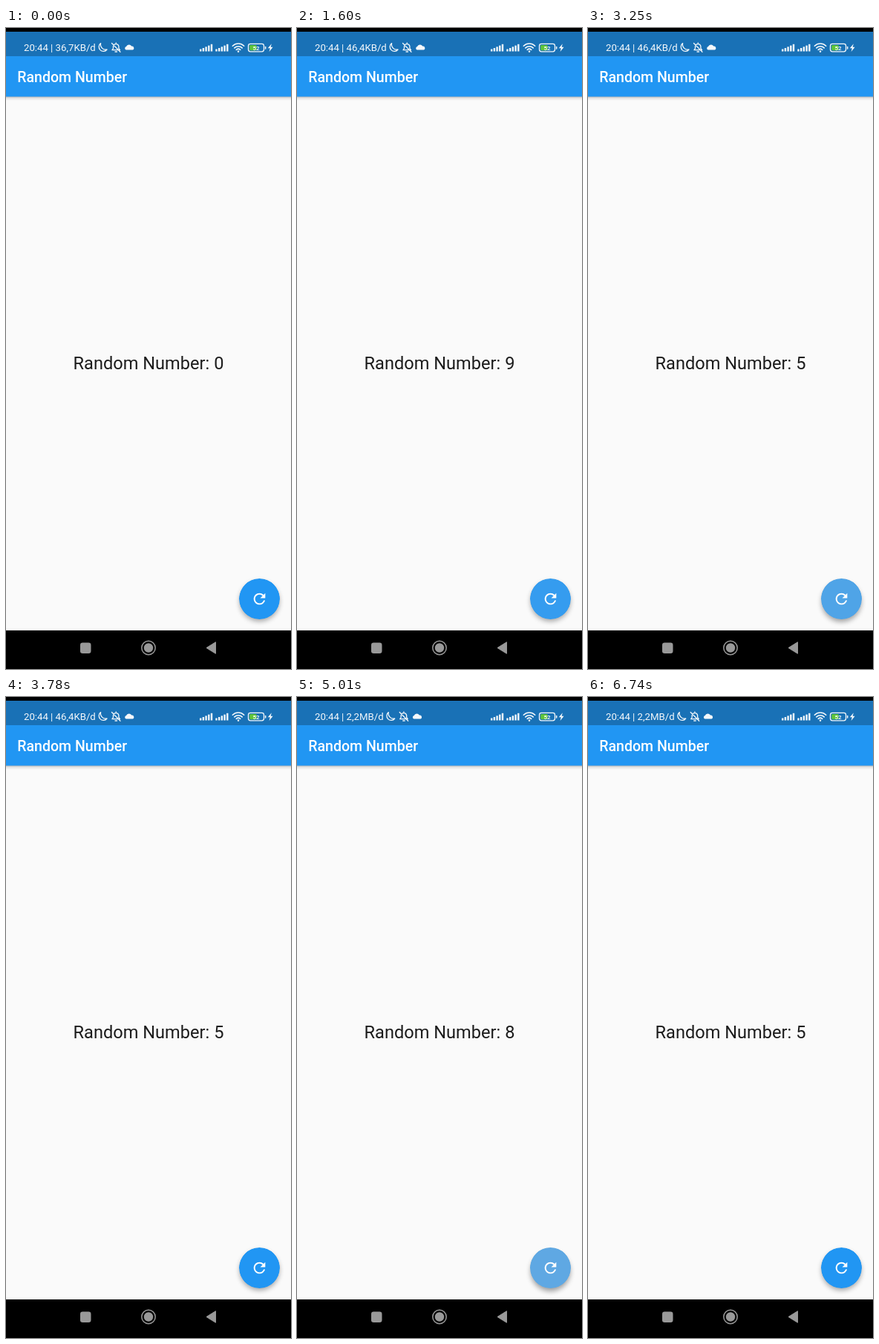
An HTML page for the animation above (6.78 s loop, 384x864 px).

```html
<!DOCTYPE html>
<html lang="en">
<head>
<meta charset="utf-8">
<title>Random Number</title>
<style>
  html, body { margin: 0; width: 100%; height: 100%; overflow: hidden; background: #000; }
  svg { display: block; width: 100%; height: 100%; }
  text { font-family: Roboto, sans-serif; }
  .line { fill: none; stroke: #f4f8fb; stroke-width: 1.3; stroke-linecap: round; stroke-linejoin: round; }
</style>
</head>
<body>
<svg viewBox="0 0 384 864">
  <defs>
    <clipPath id="disc"><circle cx="341.5" cy="769.5" r="27.5"/></clipPath>
    <filter id="blur" x="-50%" y="-50%" width="200%" height="200%"><feGaussianBlur stdDeviation="3.5"/></filter>
    <linearGradient id="edge" x2="0" y2="1">
      <stop stop-opacity=".3"/>
      <stop offset=".4" stop-opacity=".1"/>
      <stop offset="1" stop-opacity="0"/>
    </linearGradient>
    <g id="signal" fill="#f4f8fb">
      <rect y="28.5" width="2.4" height="3"/>
      <rect x="3.7" y="27" width="2.4" height="4.5"/>
      <rect x="7.4" y="25.3" width="2.4" height="6.2"/>
      <rect x="11.1" y="23.6" width="2.4" height="7.9"/>
      <rect x="14.8" y="21.8" width="2.4" height="9.7"/>
    </g>
  </defs>

  <rect width="384" height="864"/>
  <rect y="92" width="384" height="720" fill="#fafafa"/>
  <rect y="92" width="384" height="6" fill="url(#edge)"/>
  <rect y="5" width="384" height="33" fill="#1971b6"/>
  <rect y="38" width="384" height="54.5" fill="#2196f3"/>

  <!-- status bar -->
  <text id="speed" x="24" y="31" font-size="13.2" fill="#f4f8fb"></text>
  <g id="icons">
    <path class="line" d="M127.6 20.6A6 6 0 1 0 136 29A7 7 0 0 1 127.6 20.6Z"/>
    <path class="line" d="M143 29.7h10.5l-1.6-2.2v-3a3.8 3.8 0 0 0-7.4 0v3zM147 32h2.5M148.2 20v.7M142.5 20.5L154 32.2"/>
    <path fill="#f4f8fb" d="M161.8 29.5a2.4 2.4 0 0 1 .2-4.6a4 4 0 0 1 7.2-.3a2.5 2.5 0 0 1 1.2 4.9z"/>
  </g>
  <use href="#signal" x="261"/>
  <use href="#signal" x="282.3"/>
  <g class="line" style="stroke-width:1.6">
    <path d="M305.3 24.2a11 11 0 0 1 15.4 0M307.8 26.9a7.4 7.4 0 0 1 10.4 0M310.3 29.4a4 4 0 0 1 5.4 0"/>
    <circle cx="313" cy="31.6" r=".5"/>
  </g>
  <rect class="line" x="326.5" y="21.3" width="21" height="10.6" rx="2.8"/>
  <rect x="328.2" y="23" width="9.5" height="7.2" rx="1.4" fill="#5fc43a"/>
  <rect x="348.9" y="24.7" width="1.5" height="4" rx=".7" fill="#f4f8fb"/>
  <text x="337" y="29.6" font-size="8" font-weight="500" text-anchor="middle" fill="#fff">52</text>
  <path fill="#f4f8fb" d="M357.8 21.2l-5 6h3l-1.2 4.8 5-6.2h-3z"/>

  <text x="15.3" y="72.7" font-size="19.55" font-weight="500" fill="#fff">Random Number</text>
  <text id="result" x="192" y="460.3" font-size="23.6" text-anchor="middle" fill="#1c1c1c"></text>

  <!-- floating button -->
  <circle id="shadow" cx="341.5" r="26.5" filter="url(#blur)"/>
  <g clip-path="url(#disc)">
    <circle cx="341.5" cy="769.5" r="27.5" fill="#2196f3"/>
    <rect id="glow" x="314" y="742" width="55" height="55" fill="#bcbcbc"/>
    <circle id="splash" cx="360" cy="770" fill="#c8c8c8"/>
  </g>
  <path fill="#fff" transform="translate(329.8 757.8) scale(.977)" d="M17.65 6.35A7.958 7.958 0 0 0 12 4c-4.42 0-7.99 3.58-7.99 8s3.57 8 7.99 8c3.73 0 6.84-2.55 7.73-6h-2.08A5.99 5.99 0 0 1 12 18c-3.31 0-6-2.69-6-6s2.69-6 6-6c1.66 0 3.14.69 4.22 1.78L13 11h7V4z"/>

  <!-- navigation bar -->
  <g fill="#999">
    <rect x="100" y="828.5" width="14.5" height="14.5" rx="3.2"/>
    <circle cx="192" cy="835.5" r="6.2"/>
    <circle cx="192" cy="835.5" r="9.2" fill="none" stroke="#999" stroke-width="1.5"/>
    <path d="M270 835.5l12.5-7.8v15.6z" stroke="#999" stroke-linejoin="round"/>
  </g>
</svg>
<script>
const LOOP = 6780, HOLD = 130, FADE = 200, RADIUS = 54;
// release time of each tap and the number it yields
const TAPS = [[615, 9], [1460, 9], [2306, 5], [3160, 5], [4235, 8], [4950, 8], [5660, 7], [6400, 5]];
const $ = id => document.getElementById(id);
const clamp = x => Math.max(0, Math.min(1, x));
const mix = (a, b, p) => a + (b - a) * p;

function set(id, attrs) {
  for (const name in attrs) $(id).setAttribute(name, attrs[name]);
}

function draw(t) {
  const done = TAPS.filter(tap => tap[0] <= t).pop();
  const early = t < 4600;
  $('result').textContent = 'Random Number: ' + (done ? done[1] : 0);
  $('speed').textContent = '20:44 | ' + (t < 600 ? '36,7KB/d' : early ? '46,4KB/d' : '2,2MB/d');
  set('icons', { transform: `translate(${early ? 0 : -4.3} 0)` });

  // the splash creeps while pressed, then bursts and fades on release
  const tap = TAPS.filter(tap => tap[0] - HOLD <= t).pop();
  const held = tap ? t - tap[0] + HOLD : -1;
  const freed = Math.max(0, held - HOLD);
  const press = clamp((Math.min(held, HOLD) - freed) / FADE);
  const creep = RADIUS * clamp(Math.min(held, HOLD) / 1000);
  set('splash', {
    r: mix(creep, RADIUS, clamp(freed / RADIUS)),
    opacity: held < 0 ? 0 : .4 * clamp(1 - freed / FADE)
  });
  set('glow', { opacity: .4 * press });
  set('shadow', { cy: mix(773, 777, press), opacity: mix(.36, .42, press) });
}

function tick() {
  draw(performance.now() % LOOP);
  requestAnimationFrame(tick);
}
tick();
</script>
</body>
</html>
```
